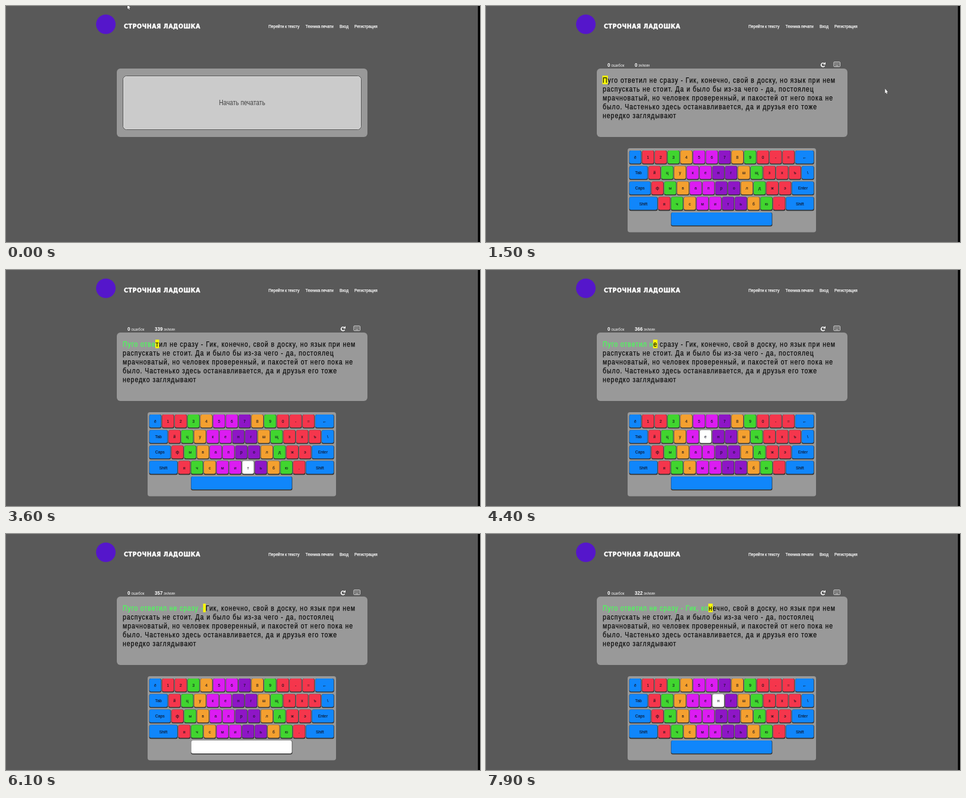
Animation of 800x400 px, one loop 8000 ms. Source, as an HTML page with a canvas:

```html
<!DOCTYPE html>
<html lang="ru">
<head>
<meta charset="utf-8">
<title>Тренажёр печати</title>
<style>
  html, body { margin: 0; width: 100%; height: 100%; overflow: hidden; background: #595959; }
  canvas { display: block; }
</style>
</head>
<body>
<canvas id="stage" width="800" height="400"></canvas>
<script>
const ctx = document.getElementById('stage').getContext('2d');
const LOOP = 8000;
const ASPECT = 0.85; // the whole page is shown slightly narrowed
const SANS = '"Liberation Sans", Arial, sans-serif';

const LINES = [
  'Пуго ответил не сразу - Гик, конечно, свой в доску, но язык при нем',
  'распускать не стоит. Да и было бы из-за чего - да, постоялец',
  'мрачноватый, но человек проверенный, и пакостей от него пока не',
  'было. Частенько здесь останавливается, да и друзья его тоже',
  'нередко заглядывают'
];
const PASSAGE = { size: 12.4, spacing: 1.12, bold: 0.25 };

const CLICK = 500, KEYBOARD_SHOWN = 1200, POINTER_HIDDEN = 3400;
const PRESS = 110, SHIFT_PRESS = 260;

// [characters typed, time]; strokes in between are evenly spaced
const PACE = [[1, 1969], [2, 2299.5], [9, 3562], [21, 5250], [26, 6711], [31, 7745], [32, 7990]];
const strokes = [];
PACE.slice(1).forEach(([count, end], i) => {
  const [from, start] = PACE[i];
  for (let k = from; k <= count; k++) strokes[k] = start + (end - start) * (k - from) / (count - from);
});

const COLORS = { b: '#1086fb', r: '#f5364c', g: '#40d52f', o: '#f4a02f', m: '#dc1cf2', p: '#8e16c6' };
const PITCH = 21.55, KEY_W = 19.6, KEY_H = 22, LEFT = 242, RIGHT = 553;

// left key, its width, middle keys, their colours, right key
const ROWS = [
  ['ё', 19.6, '1234567890-=', 'rrgommpogrrr', '←'],
  ['Tab', 30.5, 'йцукенгшщзхъ', 'rgommppogrrr', '\\'],
  ['Caps', 35.5, 'фывапролджэ', 'rgommppogrr', 'Enter'],
  ['Shift', 47, 'ячсмитьбю.', 'rgommppogr', 'Shift']
];

const keys = [];
ROWS.forEach(([first, firstWidth, middle, colors, last], row) => {
  const y = 245 + row * 26.2;
  const add = (label, x, w, color) => keys.push({ label, x, y, w, color: COLORS[color] });
  let x = LEFT + firstWidth + 2;
  add(first, LEFT, firstWidth, 'b');
  [...middle].forEach((label, i) => { add(label, x, KEY_W, colors[i]); x += PITCH; });
  add(last, x, RIGHT - x, 'b');
});
keys.push({ label: ' ', x: 312.5, y: 350, w: 170, color: COLORS.b });

function box(x, y, w, h, r, fill, stroke) {
  ctx.beginPath();
  ctx.roundRect(x, y, w, h, r);
  if (fill) { ctx.fillStyle = fill; ctx.fill(); }
  if (stroke) { ctx.strokeStyle = stroke; ctx.lineWidth = 1; ctx.stroke(); }
}

// Returns the width of the drawn text on the stage.
function text(str, x, y, size, color, { weight = '', family = SANS, align = 'left', spacing = 0, bold = 0 } = {}) {
  ctx.save();
  ctx.translate(x, y);
  ctx.scale(ASPECT, 1);
  ctx.font = `${weight} ${size}px ${family}`;
  ctx.letterSpacing = spacing + 'px';
  ctx.textAlign = align;
  ctx.fillStyle = ctx.strokeStyle = color;
  ctx.fillText(str, 0, 0);
  if (bold) { ctx.lineWidth = bold; ctx.strokeText(str, 0, 0); }
  const width = ctx.measureText(str).width * ASPECT;
  ctx.restore();
  return width;
}

function drawHeader() {
  ctx.fillStyle = '#5516cb';
  ctx.beginPath();
  ctx.arc(168.5, 31, 16.5, 0, Math.PI * 2);
  ctx.fill();
  text('СТРОЧНАЯ ЛАДОШКА', 199, 37.5, 11.2, '#fff',
    { weight: 'bold', family: '"DejaVu Sans", sans-serif', spacing: 0.6, bold: 0.5 });
  [['Перейти к тексту', 443], ['Техника печати', 505.5], ['Вход', 563], ['Регистрация', 588]]
    .forEach(([label, x]) => text(label, x, 36.5, 7.8, '#fff', { bold: 0.25 }));
}

function drawButton() {
  box(197.5, 118.5, 402, 91, 6, '#cbcbcb', '#555');
  box(198.5, 119.5, 400, 89, 5, null, '#d8d8d8');
  text('Начать печатать', 398.5, 167.5, 12, '#444', { align: 'center' });
}

function drawPassage(typed, active) {
  LINES.forEach((line, i) => {
    let x = 197;
    const y = 129.5 + i * 15;
    if (i === 0 && active) {
      if (typed) x += text(line.slice(0, typed), x, y, PASSAGE.size, '#52f560', { ...PASSAGE, bold: 0.45 });
      ctx.font = `${PASSAGE.size}px ${SANS}`;
      const width = (ctx.measureText(line[typed]).width + PASSAGE.spacing) * ASPECT;
      ctx.fillStyle = '#ff0';
      ctx.fillRect(x - 0.5, 118, width + 0.5, 14.5);
      line = line.slice(typed);
    }
    text(line, x, y, PASSAGE.size, '#0a0a0a', PASSAGE);
  });
}

function drawStats(typed) {
  const speed = typed > 1 ? Math.round(typed * 60000 / (strokes[typed] - strokes[1])) : 0;
  text('0', 205, 103, 9.5, '#fff', { weight: 'bold' });
  text('ошибок', 211.5, 103, 7.4, '#eee');
  const width = text(String(speed), 251, 103, 9.5, '#fff', { weight: 'bold' });
  text('зн/мин', 252.5 + width, 103, 7.4, '#eee');
}

function drawIcons() {
  ctx.strokeStyle = ctx.fillStyle = '#fff';
  ctx.lineWidth = 1.5;
  ctx.beginPath();
  ctx.arc(568.8, 99.8, 3.1, 0.5, 5.5);
  ctx.stroke();
  ctx.beginPath();
  ctx.moveTo(573, 95);
  ctx.lineTo(573, 99.3);
  ctx.lineTo(569, 99.3);
  ctx.fill();

  box(587, 94.8, 10.5, 8, 1, null, '#ddd');
  ctx.fillStyle = '#ccc';
  for (let row = 0; row < 2; row++)
    for (let col = 0; col < 4; col++) ctx.fillRect(588.6 + col * 2, 96.4 + row * 2, 1.2, 1.1);
  ctx.fillRect(589.5, 100.5, 5.5, 1);
}

function drawKeyboard(t, typed) {
  const next = LINES[0][typed];
  const wait = strokes[typed + 1] - t;
  const shifted = next === ',' || next !== next.toLowerCase();
  const target = next === ',' ? '.' : next.toLowerCase();
  const isLit = key => key.label === target && wait <= PRESS
    || key.label === 'Shift' && key.x === LEFT && shifted && wait <= SHIFT_PRESS;

  box(239, 241, 318, 142.5, 4, '#999');
  for (const key of keys) {
    box(key.x - 0.4, key.y, key.w + 1.2, KEY_H + 1.6, 3, '#333');
    box(key.x, key.y, key.w, KEY_H, 3, isLit(key) ? '#fff' : key.color);
    text(key.label, key.x + key.w / 2, key.y + 14, 8, 'rgba(15,15,30,.9)', { align: 'center', bold: 0.15 });
  }
}

function drawPointer(t) {
  if (t >= POINTER_HIDDEN) return;
  const p = Math.min(t / 450, 1);
  const ease = p * p * (3 - 2 * p);
  const [x, y] = t < KEYBOARD_SHOWN ? [205 + 179.5 * ease, -3 + 172 * ease] : [673.5, 140];
  const outline = [[0, 0], [0, 8], [1.6, 6.6], [2.7, 9], [3.9, 8.5], [2.8, 6.2], [4.8, 6]];
  ctx.beginPath();
  outline.forEach(([dx, dy]) => ctx.lineTo(x + dx, y + dy));
  ctx.closePath();
  ctx.strokeStyle = '#333';
  ctx.lineWidth = 0.8;
  ctx.stroke();
  ctx.fillStyle = '#fff';
  ctx.fill();
}

function draw(t) {
  let typed = 0;
  while (strokes[typed + 1] <= t) typed++;
  typed = Math.min(typed, strokes.length - 2);
  const active = t >= KEYBOARD_SHOWN;

  ctx.fillStyle = '#595959';
  ctx.fillRect(0, 0, 800, 400);
  ctx.fillStyle = '#000';
  ctx.fillRect(796.5, 0, 3.5, 400);
  drawHeader();
  box(187, 106, 423, 116, 6, '#999');

  if (t < CLICK) drawButton();
  else drawPassage(typed, active);

  if (active) {
    drawStats(typed);
    drawIcons();
    drawKeyboard(t, typed);
  }
  drawPointer(t);
}

const begin = performance.now();
function frame() {
  draw((performance.now() - begin) % LOOP);
  requestAnimationFrame(frame);
}
frame();
</script>
</body>
</html>
```
